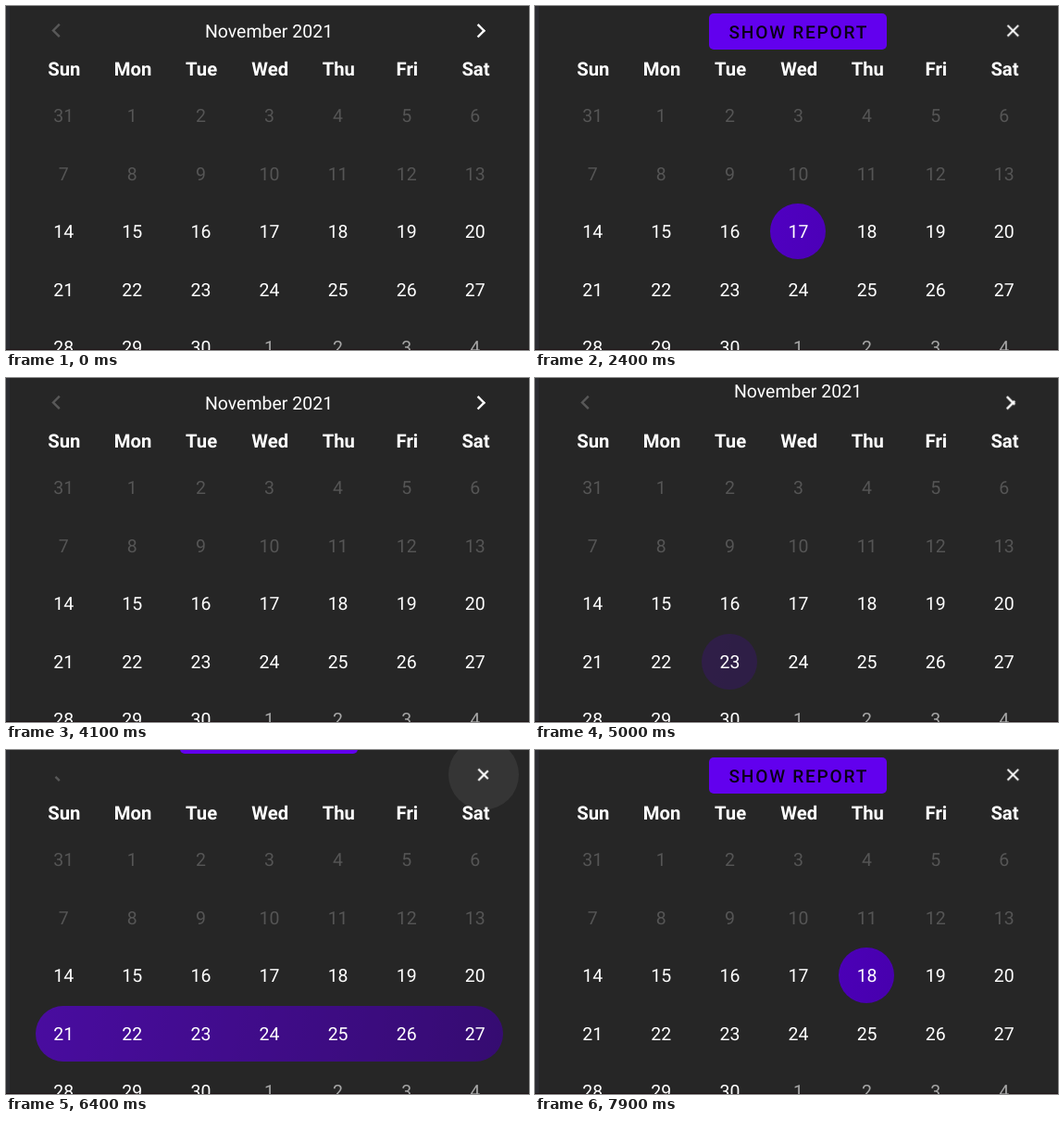
These frames come from a looping animation (565x371 px, 8000 ms). An HTML page:

```html
<!DOCTYPE html>
<html lang="en">
<head>
<meta charset="utf-8">
<title>Calendar</title>
<style>
html, body { margin: 0; width: 100%; height: 100%; overflow: hidden; background: #262626; }
svg { display: block; width: 565px; height: 371px; }
text { font: 19.5px Roboto, sans-serif; fill: #fff; text-anchor: middle; text-rendering: geometricPrecision; }
.head { font-size: 20.3px; font-weight: 700; }
.past { fill: #555; }
.next { fill: #a6a6a6; }
.label { font-size: 19.2px; font-weight: 500; letter-spacing: .0893em; fill: #0a0018; }
.line { fill: none; stroke-width: 2.4; stroke-dasharray: 100 200; }

.title, .button, .pill, .hover, .cross, .back { animation: 8s linear infinite; }
.title { animation-name: title; }
.button { animation-name: button; }
.pill { animation-name: place, fade; }
.hover { animation-name: hover; }
.cross { animation-name: cross; stroke: #fff; transform-origin: 516.4px 26.7px; }
.back { animation-name: back; stroke: #585858; }

/* the title leaves upwards, then the button drops in, and back again */
@keyframes title {
  0%, 7.5%, 43.9%, 61.25%, 82.65%, 91.25% { transform: none; animation-timing-function: ease-in; }
  10.15%, 41.4%, 63.9%, 80.15%, 93.9%, 100% { transform: translateY(-47px); animation-timing-function: ease-out; }
}
@keyframes button {
  0%, 10.15%, 41.4%, 63.9%, 80.15%, 93.9% { transform: translateY(-47px); animation-timing-function: ease-out; }
  12.8%, 38.75%, 66.55%, 77.5%, 96.55%, 100% { transform: none; animation-timing-function: ease-in; }
}
@keyframes place {
  0%, 23.75% { x: 106px; y: 213px; width: 60px; animation-timing-function: ease-in; }
  26.25% { x: 154px; width: 112px; animation-timing-function: ease-out; }
  28.75%, 43.8% { x: 254px; y: 213px; width: 60px; animation-timing-function: step-end; }
  43.81%, 64.5% { x: 180px; y: 276px; width: 60px; animation-timing-function: ease; }
  68.75%, 82.6% { x: 32px; y: 276px; width: 505px; animation-timing-function: step-end; }
  82.61%, 100% { x: 328px; y: 213px; width: 60px; }
}
@keyframes fade {
  0%, 8.25%, 43.75%, 62%, 82.5%, 92% { opacity: 0; }
  10.75%, 40%, 64.5%, 78.75%, 94.5%, 100% { opacity: 1; }
}
@keyframes hover {
  0%, 38.1%, 44.4%, 76.9%, 83.2%, 100% { opacity: 0; }
  39.4%, 41.3%, 78.1%, 80.1% { opacity: .07; }
}
/* the arrow arms grow past its tip into a smaller cross */
@keyframes cross {
  0%, 8.1%, 43.75%, 61.85%, 82.5%, 91.85% { stroke-dashoffset: 44; transform: none; }
  11.9%, 40%, 65.6%, 78.75%, 95.6%, 100% { stroke-dashoffset: 0; transform: scale(.86); }
}
@keyframes back {
  0%, 8.75%, 43.75%, 62.5%, 82.5%, 92.5% { stroke-dashoffset: 0; stroke-opacity: 1; }
  12.4%, 66.2%, 96.2% { stroke-dashoffset: 100; stroke-opacity: 1; }
  12.5%, 40%, 66.3%, 78.75%, 96.3%, 100% { stroke-dashoffset: 100; stroke-opacity: 0; }
  40.1%, 78.85% { stroke-dashoffset: 100; stroke-opacity: 1; }
}
</style>
</head>
<body>
<svg viewBox="0 0 565 371" xmlns="http://www.w3.org/2000/svg">
  <defs>
    <linearGradient id="violet" gradientUnits="userSpaceOnUse" x1="32" y1="240" x2="537" y2="340">
      <stop offset="0" stop-color="#5c00df"/>
      <stop offset="1" stop-color="#3e0097"/>
    </linearGradient>
  </defs>
  <rect width="565" height="371" fill="#262626"/>
  <rect width="4" height="371" fill="#2c2d32"/>
  <rect y="370" width="565" height="1" fill="#1f1517"/>
  <rect class="pill" x="106" y="213" width="60" height="60" rx="30" fill="url(#violet)"/>
  <circle class="hover" cx="516" cy="26.5" r="38" fill="#fff"/>
  <g id="grid"></g>
  <text class="title" x="284" y="34.3">November 2021</text>
  <g class="button">
    <rect x="188" y="8" width="192" height="39" rx="5" fill="#6200ee"/>
    <text class="label" x="284.8" y="34.5">SHOW REPORT</text>
  </g>
  <path class="line back" pathLength="100" d="M57.8 33.2 L51 26.4 L57.8 19.6"/>
  <path class="line cross" pathLength="100" d="M509.6 19.9 L523.2 33.5"/>
  <path class="line cross" pathLength="100" d="M509.6 33.5 L523.2 19.9"/>
</svg>
<script>
const grid = document.getElementById('grid');

function label(text, x, y, kind) {
  const el = document.createElementNS('http://www.w3.org/2000/svg', 'text');
  el.setAttribute('x', x);
  el.setAttribute('y', y);
  if (kind) el.setAttribute('class', kind);
  el.textContent = text;
  grid.append(el);
}

const column = i => 62.2 + i * 74.1;

['Sun', 'Mon', 'Tue', 'Wed', 'Thu', 'Fri', 'Sat'].forEach((name, i) => label(name, column(i) + .7, 74.5, 'head'));

for (let i = 0; i < 35; i++) {
  const date = new Date(2021, 9, 31 + i);
  const kind = i < 14 ? 'past' : i > 30 ? 'next' : '';
  label(date.getDate(), column(i % 7), 125.4 + Math.floor(i / 7) * 62.5, kind);
}
</script>
</body>
</html>
```
